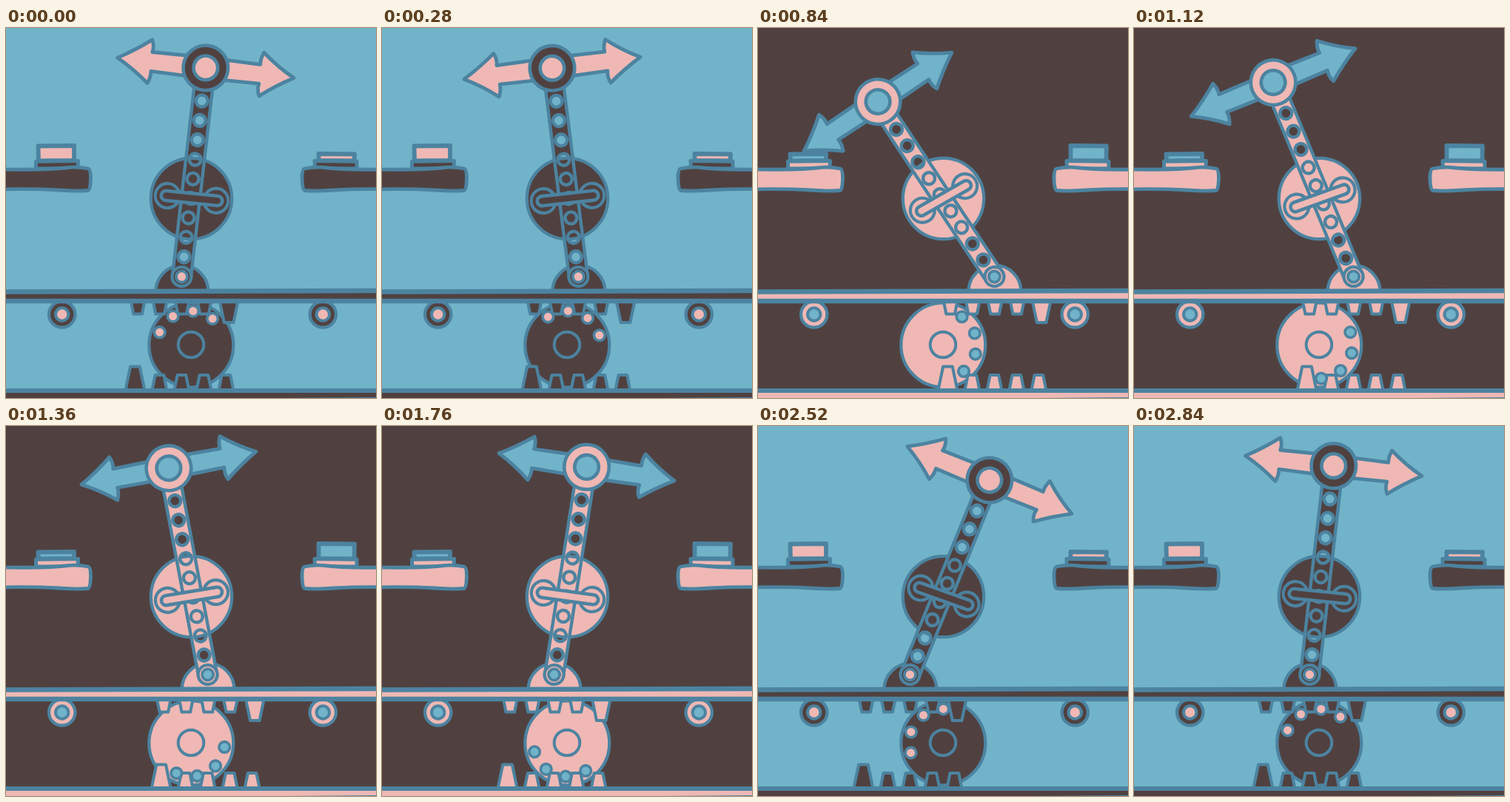
These frames come from a looping animation (500 by 500 pixels, 2880 ms). An HTML page with a canvas:

```html
<!DOCTYPE html>
<html lang="en">
<head>
<meta charset="utf-8">
<title>Rocker mechanism</title>
<style>
  html, body { margin: 0; width: 100%; height: 100%; overflow: hidden; }
  canvas { display: block; width: 100%; height: 100%; }
</style>
</head>
<body>
<canvas id="stage" width="500" height="500"></canvas>
<script>
const ctx = document.getElementById('stage').getContext('2d');
const SKY = '#71b3c9', DARK = '#504140', PINK = '#efb8b4', LINE = '#4c83a0';

const STEP = 40, STEPS = 72;         // ms per pose, poses per loop
const PERIOD = 71;                   // poses in one full swing
const PEAK = 21.4;                   // pose at which the slider is furthest right
const DARK_FROM = 21, DARK_TO = 57;  // poses drawn in the dark scheme
const SPIN_RATE = 4.88;              // gear degrees per pose
const ROD = 284;

const rad = deg => deg * Math.PI / 180;

// Triangle wave from -1 to 1, stopped short by the left button
function swing(step) {
  const phase = ((step - PEAK) / PERIOD + 1) % 1;
  return Math.min(0.95, Math.abs(phase - 0.5) * 4 - 1);
}

// The gear skips ahead when the light scheme returns, completing its turn
function gearAngle(step) {
  const skip = step < DARK_TO ? 0 : 360 - PERIOD * SPIN_RATE;
  return 201.6 + SPIN_RATE * step + skip;
}

function paint(path, fill, width = 4.2) {
  ctx.fillStyle = fill;
  ctx.fill(path, 'evenodd');
  ctx.lineWidth = width;
  ctx.stroke(path);
}

function circle(x, y, r, fill, width) {
  const p = new Path2D();
  p.arc(x, y, r, 0, 7);
  paint(p, fill, width);
}

function poly(points, fill, width) {
  const p = new Path2D();
  points.forEach(([x, y]) => p.lineTo(x, y));
  p.closePath();
  paint(p, fill, width);
}

function placed(x, y, deg, draw) {
  ctx.save();
  ctx.translate(x, y);
  ctx.rotate(rad(deg));
  draw();
  ctx.restore();
}

const arrowHalf = new Path2D(
  'M0 -14 L73 -13 Q72 -21 76 -29.5 Q97 -12 120 0 Q97 13 76 29.5 Q72 21 74 13 L0 14');
const padShape = new Path2D(
  'M-8 191 Q50 192 80 189 Q96 187 111 190 Q114.5 191 114.5 203 Q114 219 111 219.5 Q95 221 70 219 Q35 217 -8 218Z');

function drawRod(body) {
  const p = new Path2D();
  p.moveTo(-12.5, 0);
  p.lineTo(-12.5, -ROD);
  p.lineTo(12.5, -ROD);
  p.lineTo(12.5, 0);
  p.arc(0, 0, 12.5, 0, Math.PI);
  p.closePath();
  for (let d = 27; d < 245; d += 26.5) {
    p.moveTo(8, -d);
    p.arc(0, -d, 8, 0, 7);
  }
  paint(p, body, 4.4);
}

function drawRocker(body, accent) {
  placed(0, -ROD, 0, () => {
    for (const turn of [0, 180]) placed(0, 0, turn, () => paint(arrowHalf, accent, 4.8));
  });
  drawRod(body);
  circle(0, 0, 13, body);
  circle(0, 0, 7.6, accent, 3.8);
  circle(0, -ROD, 30.3, body, 4.6);
  circle(0, -ROD, 16.3, accent, 4.6);
}

// Pad with its push button, in left-hand coordinates
function drawPad(pressed, body, accent) {
  const top = pressed ? 170.5 : 159.5;
  poly([[40.5, 180], [97.5, 179.5], [97, 190], [40.5, 190]], body, 5);
  poly([[43.5, top], [92, top - 0.5], [92, 179], [44, 179.5]], accent, 5.8);
  paint(padShape, body, 4.8);
}

// Five teeth around x; the one on the given side is taller
function drawRack(x, baseY, direction, tallSide, fill) {
  for (let i = -2; i <= 2; i++) {
    const tall = i === 2 * tallSide;
    const base = tall ? 13 : 10, tip = tall ? 6.3 : 5.8;
    const cx = x + 30 * i + (tall ? 3 * tallSide : 0);
    const tipY = baseY + direction * (tall ? 32 : 20.5);
    poly([[cx - base, baseY], [cx + base, baseY], [cx + tip, tipY], [cx - tip, tipY]], fill, 4);
  }
}

function drawGear(angle, body) {
  circle(250.3, 428.5, 57, body);
  circle(250, 428, 17.3, body, 4);
}

function drawBalls(angle, accent) {
  for (let i = 0; i < 4; i++) {
    const a = rad(angle + 36 * i);
    circle(250 + 45.6 * Math.cos(a), 428 + 45.6 * Math.sin(a), 7.3, accent, 3.6);
  }
}

function render(step) {
  const isDark = step >= DARK_FROM && step < DARK_TO;
  const [back, body, accent] = isDark ? [DARK, PINK, SKY] : [SKY, DARK, PINK];
  const s = swing(step);
  const x = 252 + 71 * s;
  const tilt = -0.6 - 34.8 * s;
  const linkTilt = tilt * 0.88;
  const angle = gearAngle(step);

  ctx.fillStyle = back;
  ctx.fillRect(0, 0, 500, 500);
  ctx.strokeStyle = LINE;
  ctx.lineJoin = 'round';

  drawPad(isDark, body, accent);
  placed(514.5, 0, 0, () => { ctx.scale(-1, 1); drawPad(!isDark, body, accent); });

  // Fixed disc and its two turning studs
  circle(250.5, 230.5, 54.7, body);
  placed(251, 230, linkTilt, () => {
    for (const side of [-1, 1]) circle(33 * side, 0, 16.5, body);
  });

  const dome = new Path2D();
  dome.arc(x + 0.5, 356, 35.5, Math.PI, 0);
  paint(dome, body);

  placed(x, 336, tilt, () => drawRocker(body, accent));

  placed(251, 230, linkTilt, () => {
    const link = new Path2D();
    link.roundRect(-41.5, -6.5, 83, 13, 6.5);
    paint(link, body, 4.6);
  });

  drawGear(angle, body);
  drawRack(x + 0.7, 366, 1, 1, body);
  drawRack(x, 489.5, -1, -1, body);
  drawBalls(angle, accent);

  for (const rx of [75.7, 428.3]) {
    circle(rx, 387, 17.7, body);
    circle(rx, 387, 8.7, accent, 4);
  }

  poly([[-9, 356.5], [509, 355], [509, 369], [-9, 369]], body, 6.4);
  poly([[-9, 490], [509, 490], [509, 502], [-9, 506]], body, 6);
}

function tick(now) {
  render(Math.floor(now / STEP) % STEPS);
  requestAnimationFrame(tick);
}
requestAnimationFrame(tick);
</script>
</body>
</html>
```
